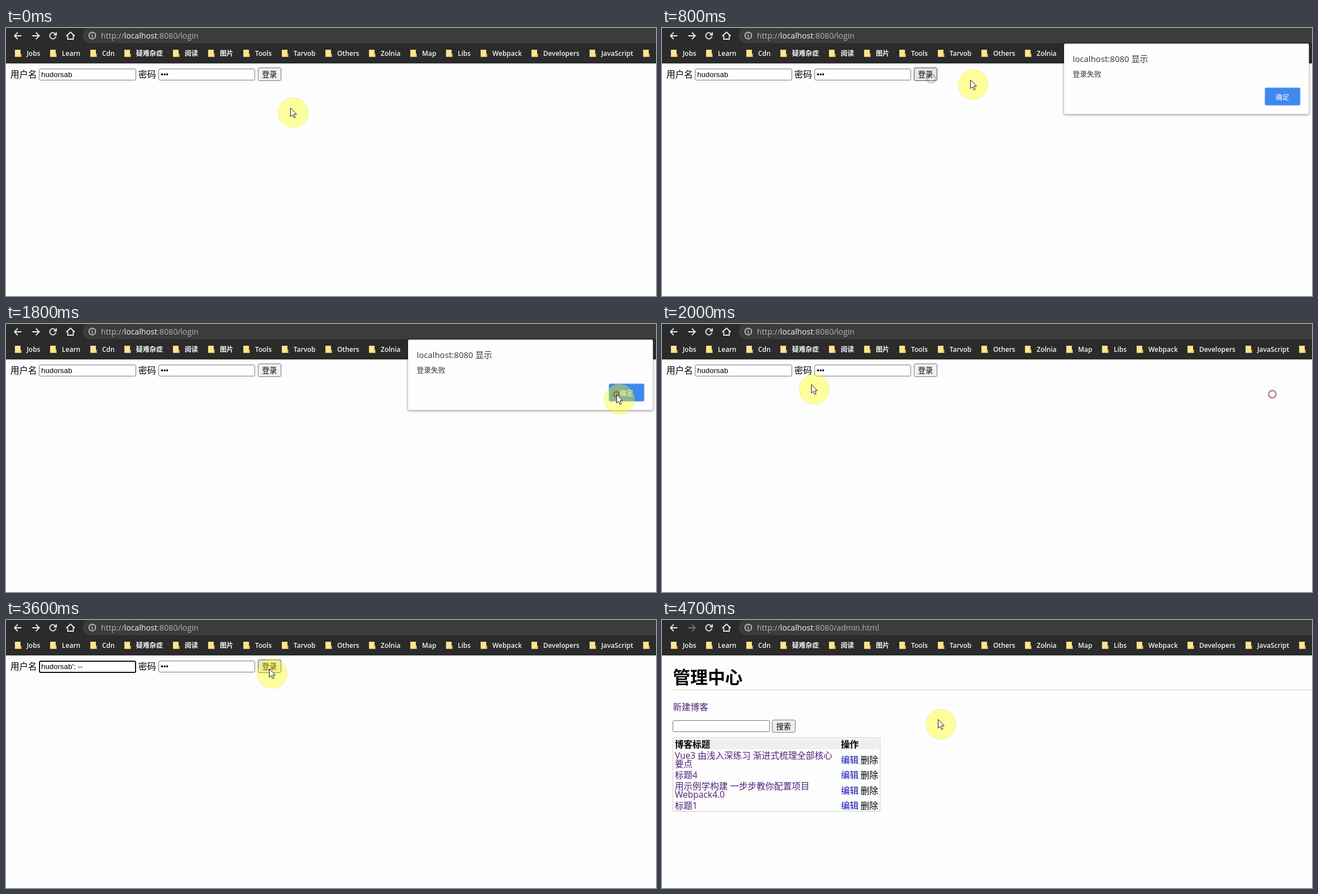
An HTML page with a canvas that plays this animation: 1164 by 481 pixels, repeating every 4.9 s.

```html
<!DOCTYPE html>
<html lang="zh-CN">
<head>
<meta charset="utf-8">
<title>Login</title>
<style>
html, body { margin: 0; width: 100%; height: 100%; overflow: hidden; background: #fdfdfd; }
canvas { display: block; }
</style>
</head>
<body>
<canvas id="stage" width="1164" height="481"></canvas>
<script>
const ctx = document.getElementById('stage').getContext('2d');
const LOOP = 4900, STEP = 100, RING_LIFE = 400;
const OPEN = 580, CLOSE = 1800, FOCUS = 2100, TYPE = 2800, BLINK = 500, ADMIN = 3900;
const UI = '"Open Sans", "Noto Sans CJK SC", "Noto Sans CJK", sans-serif';
const FIELD = '13.333px "Liberation Sans", Arial, sans-serif';
const BODY = '15.8px ' + UI;
const USER = 'hudorsab';
const BOOKMARKS = ['Jobs', 'Learn', 'Cdn', '疑难杂症', '阅读', '图片', 'Tools', 'Tarvob',
  'Others', 'Zolnia', 'Map', 'Libs', 'Webpack', 'Developers', 'JavaScript', ''];

const userBox = { x: 59, y: 73, w: 174, h: 21 };
const passBox = { x: 273, y: 73, w: 173, h: 21 };
const loginBtn = { x: 451, y: 71, w: 42, h: 24 };

const home = { x: 509, y: 143 };
const moves = [
  { from: 0, to: 500, x: 482, y: 91, click: 500 },
  { from: 700, to: 1200, x: 1154, y: 108 },
  { from: 1200, to: 1800, x: 1093, y: 126, click: CLOSE },
  { from: 1800, to: 2000, x: 267, y: 108 },
  { from: 2000, to: 2100, x: 178, y: 91, click: FOCUS },
  { from: 3000, to: 3600, x: 471, y: 87, click: 3700 },
  { from: 4500, to: 4700, x: 494, y: 178 }
];

const ramp = (t, a, b) => Math.min(1, Math.max(0, (t - a) / (b - a)));
const ease = p => p * p * (3 - 2 * p);
const inside = (b, p) => p.x >= b.x && p.x <= b.x + b.w && p.y >= b.y && p.y <= b.y + b.h;

function pointerAt(t) {
  let { x, y } = home;
  for (const m of moves) {
    const p = ease(ramp(t, m.from, m.to));
    x += (m.x - x) * p;
    y += (m.y - y) * p;
  }
  return { x, y };
}

function text(str, x, y, font, color) {
  ctx.font = font;
  ctx.fillStyle = color;
  ctx.fillText(str, x, y);
  return x + ctx.measureText(str).width;
}

function rect(x, y, w, h, color) {
  ctx.fillStyle = color;
  ctx.fillRect(x, y, w, h);
}

function paint(fill, stroke, width = 1) {
  if (fill) { ctx.fillStyle = fill; ctx.fill(); }
  if (stroke) { ctx.strokeStyle = stroke; ctx.lineWidth = width; ctx.stroke(); }
}

function roundBox(x, y, w, h, r, ...style) {
  ctx.beginPath();
  ctx.roundRect(x, y, w, h, r);
  paint(...style);
}

function circle(x, y, r, ...style) {
  ctx.beginPath();
  ctx.arc(x, y, r, 0, Math.PI * 2);
  paint(...style);
}

function shape(d, ...style) {
  const path = new Path2D(d), [fill, stroke, width = 1] = style;
  if (fill) { ctx.fillStyle = fill; ctx.fill(path); }
  if (stroke) { ctx.strokeStyle = stroke; ctx.lineWidth = width; ctx.stroke(path); }
}

function arrowIcon(x, y, dir, color) {
  ctx.save();
  ctx.translate(x, y);
  ctx.scale(dir, 1);
  shape('M-6 0H6M.5-6L6.5 0L.5 6', null, color, 1.8);
  ctx.restore();
}

function toolbar(admin) {
  const white = '#eeeeee', grey = '#b2b2b2';
  rect(0, 0, 1164, 63, '#2b2b2b');
  rect(0, 62, 1164, 1.5, '#191919');
  roundBox(137, -1, 1060, 28, 14, '#3c3c3c');

  arrowIcon(21.5, 14, -1, white);
  arrowIcon(53, 14, 1, admin ? '#747474' : white);
  shape('M89.4 15.4A5.6 5.6 0 1 1 88 10', null, white, 1.8);
  shape('M91 7V13.5H84.5Z', white);
  shape('M108 14.5L115.5 7.3L123 14.5M110.5 13V20H120.5V13', null, white, 1.8);
  circle(154.5, 13.5, 6, null, '#dddddd', 1.5);
  shape('M154.5 10.2V11.8M154.5 12.8V16.8', null, '#dddddd', 1.6);

  const font = '14.2px ' + UI;
  let x = text('http://', 170, 18.5, font, grey);
  x = text('localhost', x, 18.5, font, '#f4f4f4');
  text(admin ? ':8080/admin.html' : ':8080/login', x, 18.5, font, grey);

  let left = 16;
  for (const name of BOOKMARKS) {
    const fx = Math.round(left);
    rect(fx, 39, 10, 13, '#ffe391');
    rect(fx + 9, 46, 2.5, 6, '#f0c95f');
    rect(fx, 51, 11.5, 1, '#e9bf55');
    left = text(name, fx + 21, 50, '600 12px ' + UI, '#f6f6f6') + 17.7;
  }
}

function input(b, focused) {
  if (focused) roundBox(b.x + 1, b.y + 1, b.w - 2, b.h - 1, 2, '#fff', '#101010', 2);
  else roundBox(b.x + 0.5, b.y + 0.5, b.w - 1, b.h - 1, 2, '#fff', '#767676');
}

function button(b, label, hover) {
  roundBox(b.x + 0.5, b.y + 0.5, b.w - 1, b.h - 1, 2.5,
    hover ? '#e5e5e5' : '#efefef', hover ? '#4f4f4f' : '#767676');
  text(label, b.x + 7.5, b.y + 17, '13.333px ' + UI, '#000');
}

function loginPage(t, hover) {
  text('用户名', 8, 88.5, BODY, '#000');
  input(userBox, t >= FOCUS);
  const typed = USER + (t >= TYPE ? "'; -- " : '');
  const caret = text(typed, 63, 88, FIELD, '#000');
  if (t >= FOCUS && t < TYPE + BLINK) rect(Math.round(caret) - 1, 77, 1, 14, '#000');
  text('密码', 237, 88.5, BODY, '#000');
  input(passBox);
  text('•••', 277, 88, FIELD, '#000');
  button(loginBtn, '登录', hover);
}

function adminPage() {
  const visited = '#4f2279', link = '#1212b8';
  text('管理中心', 19.5, 114, 'bold 31.2px ' + UI, '#000');
  rect(20, 125, 1144, 1, '#cccccc');
  text('新建博客', 19.5, 162, BODY, visited);
  input({ x: 19, y: 180, w: 174, h: 21 });
  button({ x: 197, y: 179, w: 42, h: 23 }, '搜索');

  roundBox(19.5, 211.5, 371, 132, 0, null, '#cccccc');
  rect(22, 214, 296, 18, '#efefef');
  rect(320, 214, 69, 18, '#efefef');
  text('博客标题', 23, 229, 'bold ' + BODY, '#000');
  text('操作', 320.5, 229, 'bold ' + BODY, '#000');

  const rows = [
    ['Vue3 由浅入深练习 渐进式梳理全部核心', '要点'],
    ['标题4'],
    ['用示例学构建 一步步教你配置项目', 'Webpack4.0'],
    ['标题1']
  ];
  const lead = 15;
  let y = 249;
  for (const lines of rows) {
    const extra = (lines.length - 1) * lead;
    lines.forEach((s, i) => text(s, 23, y + i * lead, BODY, visited));
    text('编辑', 320.5, y + extra / 2, BODY, link);
    text('删除', 355.5, y + extra / 2, BODY, '#000');
    y += 20 + extra;
  }
}

function dialog(t) {
  const p = ramp(t, OPEN, OPEN + 150) * (1 - ramp(t, CLOSE, CLOSE + 115));
  if (!p) return;
  ctx.save();
  ctx.globalAlpha = p;
  ctx.translate(0, -18 * (1 - p));
  ctx.shadowColor = `rgba(0,0,0,${p * p / 2})`;
  ctx.shadowBlur = 4;
  ctx.shadowOffsetY = 1;
  roundBox(720, 28, 438.5, 126.5, 2, '#fefefe');
  ctx.shadowColor = 'transparent';
  text('localhost:8080 显示', 735.5, 60.5, '15px ' + UI, '#333');
  text('登录失败', 735.5, 87, '12.8px ' + UI, '#333');
  roundBox(1079.5, 107, 63.5, 32, 3, '#3f88ee', '#a9cdf8');
  text('确定', 1099, 128.5, '12px ' + UI, '#fff');
  ctx.restore();
}

function rings(t) {
  for (const { click, x, y } of moves) {
    const age = t - click;
    if (!(age >= 0 && age < RING_LIFE)) continue;
    const alpha = 0.9 * (1 - age / RING_LIFE);
    circle(x, y, 4.5 + age * 0.01, null, `rgba(110,20,16,${alpha})`, 3);
  }
}

function pointer({ x, y }, beam) {
  ctx.save();
  ctx.translate(x, y);
  if (beam) shape('M.5-7V7M-3-7.5H0M1-7.5H4M-3 7.5H0M1 7.5H4', null, '#222');
  else shape('M.5.5V16L4 12.7L6.6 18.4L9 17.3L6.5 11.8H11.3Z', '#fff', '#1a1a1a');
  ctx.restore();
}

function draw(t) {
  const at = pointerAt(t);
  const admin = t >= ADMIN;
  const modal = t >= 500 && t < CLOSE;
  const beam = !admin && !modal && (inside(userBox, at) || inside(passBox, at));

  rect(0, 0, 1164, 481, '#fdfdfd');
  toolbar(admin);
  if (admin) adminPage();
  else loginPage(t, modal || inside(loginBtn, at));
  dialog(t);
  rings(t);

  // The highlight is centred on the pointer image, not on its hot spot
  const dx = beam ? 0 : 5.5, dy = beam ? 0 : 9;
  circle(at.x + dx, at.y + dy, 27, 'rgba(255,255,0,.38)', 'rgba(200,195,120,.25)');
  pointer(at, beam);
}

const begin = performance.now();
function tick() {
  const t = (performance.now() - begin) % LOOP;
  draw(Math.floor(t / STEP) * STEP);
  requestAnimationFrame(tick);
}
tick();
</script>
</body>
</html>
```
